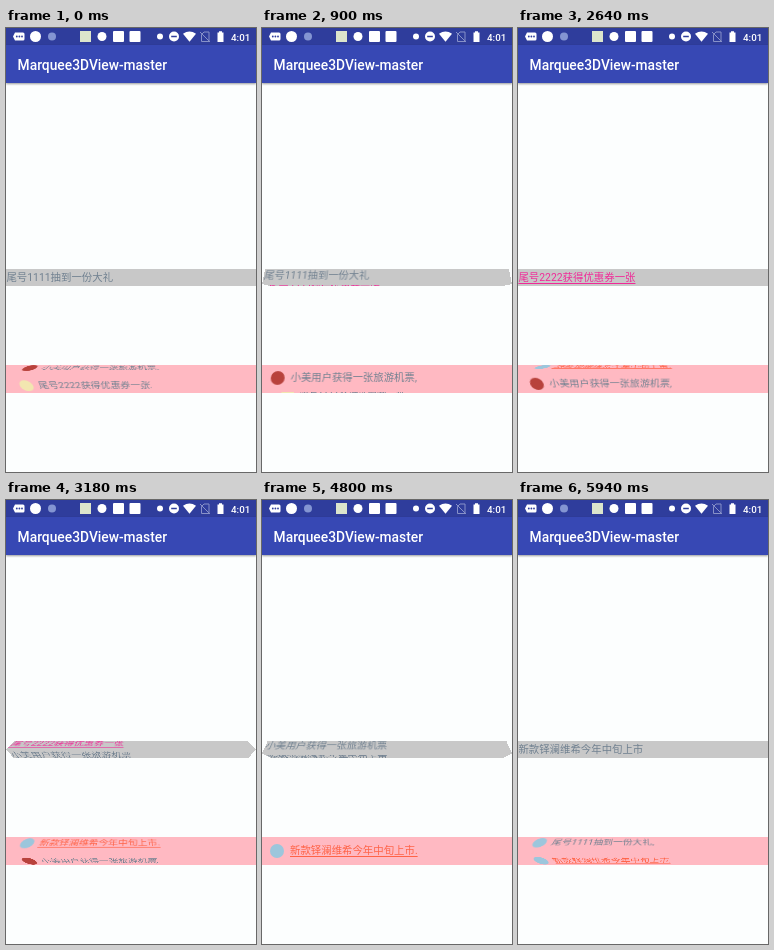
An HTML page for the animation above (6 s loop, 250x444 px).

```html
<!DOCTYPE html>
<html lang="zh-CN">
<head>
<meta charset="utf-8">
<title>Marquee3DView-master</title>
<style>
html, body { margin: 0; width: 100%; height: 100%; overflow: hidden; background: #fcfefe; }
body { position: relative; font-family: Roboto, "Noto Sans CJK SC", "Noto Sans CJK", sans-serif; }
#status { position: absolute; left: 0; top: 0; background: #2f3d9c; }
#bar {
  position: absolute; left: 0; top: 16.7px; width: 250px; height: 38.8px; box-sizing: border-box;
  padding-left: 11.6px; background: #3748b4; color: #fff; font-size: 13.8px; font-weight: 500;
  line-height: 40px; box-shadow: 0 1px 2px rgba(0, 0, 0, .4);
}
.marquee { position: absolute; left: 0; width: 250px; }
.face {
  position: absolute; left: 0; top: 0; width: 100%; height: 100%;
  font-size: 10.42px; color: #708090; white-space: nowrap;
}
.face span { position: absolute; top: 0; }
.face i { position: absolute; left: 7.5px; top: 7px; width: 14px; height: 14px; border-radius: 50%; }
.link { text-decoration: underline 1px; text-underline-offset: 1.6px; text-decoration-skip-ink: none; }
#plain { top: 241px; height: 17.4px; line-height: 17.4px; overflow: hidden; }
#plain .face { background: #c8c8c8; }
#plain span { left: .4px; }
#avatars { top: 337.2px; height: 27.8px; line-height: 27.2px; background: #ffb9c2; }
#avatars span { left: 28px; }
</style>
</head>
<body>
<svg id="status" width="250" height="17" fill="#fff">
  <path d="M9 4.5h8a1.5 1.5 0 0 1 1.5 1.5v5a1.5 1.5 0 0 1-1.5 1.5h-8l-2-4z"/>
  <g fill="#2f3d9c"><circle cx="10.8" cy="8.5" r=".9"/><circle cx="13.4" cy="8.5" r=".9"/><circle cx="16" cy="8.5" r=".9"/></g>
  <circle cx="29.5" cy="8.5" r="5.5"/>
  <circle cx="46" cy="8.5" r="4" fill="#8495d2"/>
  <rect x="74" y="3" width="11" height="11" fill="#dce5cc"/>
  <circle cx="96" cy="8.5" r="4.5"/>
  <rect x="107" y="3" width="11" height="11" rx="1"/>
  <rect x="123.5" y="3" width="11" height="11" rx="1"/>
  <circle cx="154" cy="8.5" r="3"/>
  <circle cx="168" cy="8.5" r="5"/>
  <path d="M165.2 8.5h5.6" stroke="#2f3d9c" stroke-width="1.5"/>
  <path d="M177 5.7q6.5-4.6 13 0l-6.5 8z"/>
  <path d="M195.5 6.5l2.5-2.5h5v9.5h-7.5zM194 4l10 10" fill="none" stroke="#8791c8"/>
  <path d="M211.5 4.5h1.5v-1.2h3v1.2h1.5v9.5h-6z"/>
  <text x="225" y="12.6" font-size="9.8" font-weight="500">4:01</text>
</svg>
<div id="bar">Marquee3DView-master</div>
<div id="plain" class="marquee"></div>
<div id="avatars" class="marquee"></div>
<script>
const LOOP = 6000, STEP = 60, CAMERA = 133.3;
const RED = "#b8423c", BLUE = "#9cc6dc", YELLOW = "#f2e6b0";

// Each spin is [start, duration] in ms and turns to the next item.
const marquees = [
  {
    id: "plain", height: 17.4, up: true,
    spins: [[768, 940], [2680, 940], [4525, 940]],
    items: [
      { text: "尾号1111抽到一份大礼" },
      { text: "尾号2222获得优惠券一张", link: "#f02a98" },
      { text: "小美用户获得一张旅游机票" },
      { text: "新款铎澜维希今年中旬上市" }
    ]
  },
  {
    id: "avatars", height: 27.8, up: false,
    spins: [[-490, 1450], [2310, 1450], [5210, 1300]],
    items: [
      { text: "尾号2222获得优惠券一张.", icon: YELLOW },
      { text: "小美用户获得一张旅游机票,", icon: RED },
      { text: "新款铎澜维希今年中旬上市.", icon: BLUE, link: "#ff6347" },
      { text: "尾号1111抽到一份大礼,", icon: BLUE }
    ]
  }
];

function makeFace(parent, { text, icon, link }) {
  const face = document.createElement("div");
  face.className = "face";
  if (icon) face.appendChild(document.createElement("i")).style.background = icon;
  const label = face.appendChild(document.createElement("span"));
  label.textContent = text;
  if (link) {
    label.className = "link";
    label.style.color = link;
  }
  return parent.appendChild(face);
}

function place(face, edge, shift, angle) {
  face.style.display = "block";
  face.style.transformOrigin = "50% " + edge;
  face.style.transform = angle
    ? `translateY(${shift}px) perspective(${CAMERA}px) rotateX(${angle}deg)` : "none";
}

function draw({ spins, faces, height, up }, time) {
  for (const face of faces) face.style.display = "none";
  const index = spins.filter(([start, duration]) => time >= start + duration).length;
  const spin = spins[index];
  const progress = spin ? Math.max(0, (time - spin[0]) / spin[1]) : 0;
  if (!progress) return place(faces[index], "0%", 0, 0);

  // Two cube faces share a horizontal edge that travels across the view.
  const [upper, lower] = up ? [index, index + 1] : [index + 1, index];
  const fold = up ? progress : 1 - progress;
  place(faces[upper], "100%", -height * fold, 90 * fold);
  place(faces[lower], "0%", height * (1 - fold), 90 * fold - 90);
}

for (const marquee of marquees) {
  const parent = document.getElementById(marquee.id);
  marquee.faces = marquee.items.map(item => makeFace(parent, item));
}

const origin = performance.now();
function tick() {
  const elapsed = (performance.now() - origin) % LOOP;
  const time = Math.floor(elapsed / STEP) * STEP;
  for (const marquee of marquees) draw(marquee, time);
  requestAnimationFrame(tick);
}
tick();
</script>
</body>
</html>
```
